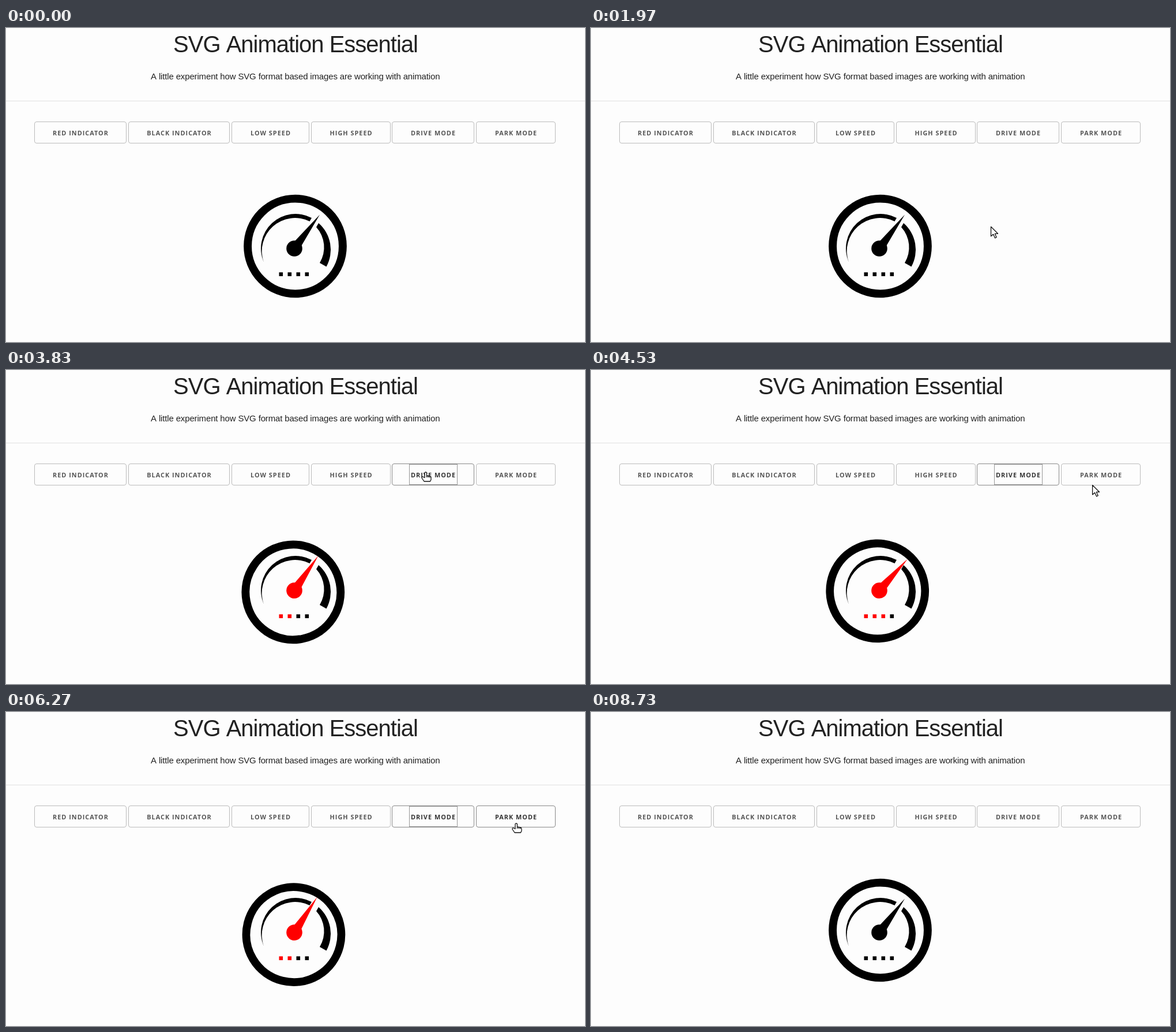
Write an HTML page that moves like this. It is 1004x544 px and loops after 8.76 s.

```html
<!DOCTYPE html>
<html lang="en">
<head>
<meta charset="utf-8">
<title>SVG Animation Essential</title>
<style>
  html, body { margin: 0; width: 100%; height: 100%; overflow: hidden; background: #fdfdfd; }
  svg { display: block; width: 100%; height: 100%; }
  text { font-family: "Liberation Sans", Arial, sans-serif; font-kerning: none; fill: #222; }
  .title { font-size: 40px; letter-spacing: -1px; }
  .lead { font-size: 15px; letter-spacing: -.155px; text-anchor: middle; }
  .btn rect { fill: none; stroke: #bbb; }
  .btn text { font: 700 10.9px "Open Sans", "Noto Sans", sans-serif; letter-spacing: 1px; text-anchor: middle; fill: #555; }
  .btn .focus { stroke-dasharray: 1 1; visibility: hidden; }
  .btn.active rect { stroke: #888; }
  .btn.active text { fill: #333; }
  .btn.focused .focus { visibility: visible; stroke: #333; }
  .cursor path { fill: #fff; stroke: #111; stroke-width: 1.3; stroke-linejoin: round; }
</style>
</head>
<body>
<svg viewBox="0 0 1004 544">
  <rect width="1004" height="544" fill="#fdfdfd"/>
  <text class="title" x="290.1" y="42">SVG Animation Essential</text>
  <text class="lead" x="501.7" y="89">A little experiment how SVG format based images are working with animation</text>
  <path d="M0 126.5H1004" stroke="#e1e1e1"/>
  <g id="buttons"></g>

  <circle id="ring" cx="501.5" cy="378" r="82.4" fill="none" stroke="#000" stroke-width="13.9"/>
  <path d="M447 406A60 60 0 0 1 530 329L526.5 335A57.5 57.5 0 0 0 447 406Z"/>
  <path d="M542 338A61 61 0 0 1 555.5 413.5L544 407A52 52 0 0 0 538 345Z"/>
  <g id="needle">
    <circle cx="500" cy="382" r="13.8"/>
    <path d="M544 323.5L511.7 378.3L500.3 369.7Z"/>
  </g>
  <g id="dots"></g>

  <g id="cursor" class="cursor">
    <path id="arrow" d="M0 0V16.5L4 13L7 19.5L9.6 18.3L6.8 12H12Z"/>
    <g id="hand">
      <path d="M-2 9.5V1.6Q-2 0 -.3 0T1.5 1.6V6L7 7Q9 7.5 9 9.5V13L7.5 16H-3L-7 10Q-7.4 7.6 -5 8Z"/>
      <path d="M1.5 6V9M4 6.7V9.2M6.5 7.2V9.6" fill="none" stroke-width="1"/>
    </g>
  </g>
</svg>
<script>
const LOOP = 8760;
const DRIVE_AT = 3100, PARK_AT = 6600, BLUR_AT = 7850;
const DRIVE = 4, PARK = 5;
const TOP = 162.5, BOTTOM = 199.5;

const specs = [
  ["RED INDICATOR", 49.5, 208.5],
  ["BLACK INDICATOR", 212.5, 387.5],
  ["LOW SPEED", 391.5, 525.5],
  ["HIGH SPEED", 529.5, 666.5],
  ["DRIVE MODE", 669.5, 811.5],
  ["PARK MODE", 815.5, 952.5]
];

// time, x, y of the pointer hot spot
const route = [
  [1690, 1004, 462], [1830, 805, 378], [1970, 693.5, 344.5], [2250, 702, 296],
  [2600, 728, 177], [4100, 728, 177], [4300, 790, 214], [4440, 840, 208],
  [4530, 869.5, 199.5], [4680, 885, 193], [7250, 885, 193], [7600, 982, 34], [7710, 1004, 6]
];

const $ = id => document.getElementById(id);

function add(parent, tag, attrs) {
  const el = document.createElementNS(parent.namespaceURI, tag);
  for (const key in attrs) el.setAttribute(key, attrs[key]);
  return parent.appendChild(el);
}

const buttons = specs.map(([label, left, right]) => {
  const g = add($("buttons"), "g", { class: "btn" });
  const width = right - left, height = BOTTOM - TOP;
  add(g, "rect", { x: left, y: TOP, width, height, rx: 3.5 });
  add(g, "text", { x: (left + right) / 2 + 0.5, y: 185.5 }).textContent = label;
  add(g, "rect", { class: "focus", x: left + 30, y: TOP + 1, width: width - 59, height: height - 2 });
  return g;
});

const dots = [0, 1, 2, 3].map(i =>
  add($("dots"), "rect", { x: 473.5 + 15 * i, y: 423.3, width: 6.6, height: 6.6 }));

function pointerAt(t) {
  const i = route.findIndex(p => p[0] > t);
  if (i < 1) return null;
  const [t0, x0, y0] = route[i - 1], [t1, x1, y1] = route[i];
  const k = (t - t0) / (t1 - t0);
  return { x: x0 + (x1 - x0) * k, y: y0 + (y1 - y0) * k };
}

function drawPointer(t) {
  const p = pointerAt(t);
  const hovered = p && p.y > TOP && p.y < BOTTOM - 0.5
    ? specs.findIndex(([, left, right]) => p.x > left && p.x < right) : -1;
  $("cursor").style.display = p ? "" : "none";
  if (p) $("cursor").setAttribute("transform", `translate(${p.x} ${p.y})`);
  $("arrow").style.display = hovered < 0 ? "" : "none";
  $("hand").style.display = hovered < 0 ? "none" : "";
  return hovered;
}

function drawButtons(t, hovered) {
  const focused = t < DRIVE_AT || t >= BLUR_AT ? -1 : t < PARK_AT ? DRIVE : PARK;
  buttons.forEach((g, i) => {
    g.classList.toggle("active", i === hovered || i === focused);
    g.classList.toggle("focused", i === focused);
  });
}

function drawGauge(t) {
  const driving = t >= DRIVE_AT && t < PARK_AT;
  const s = driving ? t - DRIVE_AT : 0;
  const turn = 1 - Math.abs(1 - (s / 1000) % 2);   // back and forth, one second each way
  const sway = -5 * Math.sin(2 * Math.PI * s / 515);
  const lit = !driving ? 0 : sway > 2.5 ? 3 : 2;
  $("ring").setAttribute("transform", `rotate(${-200 * turn} 500.7 382)`);
  $("needle").setAttribute("transform", `rotate(${sway} 500 382)`);
  $("needle").setAttribute("fill", driving ? "#f00" : "#000");
  dots.forEach((dot, i) => dot.setAttribute("fill", i < lit ? "#f00" : "#000"));
}

function draw(t) {
  drawButtons(t, drawPointer(t));
  drawGauge(t);
}

const start = performance.now();
function tick() {
  draw((performance.now() - start) % LOOP);
  requestAnimationFrame(tick);
}
tick();
</script>
</body>
</html>
```
